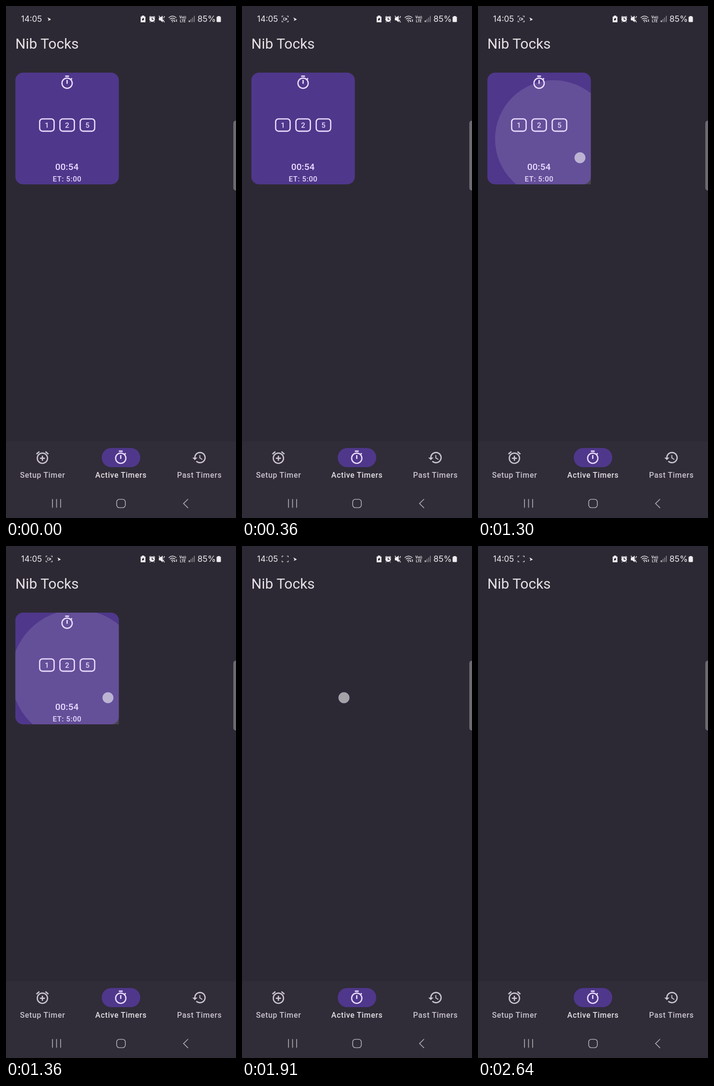
Recreate the animation shown at these times as an HTML page. Size 480 by 1068 pixels, loop 2.67 s.

```html
<!DOCTYPE html>
<html lang="en">
<head>
<meta charset="utf-8">
<title>Timer app</title>
<style>
html, body { margin: 0; width: 100%; height: 100%; overflow: hidden; background: #2d2934; }
svg { display: block; width: 100vw; height: 100vh; font-family: Roboto, sans-serif; }
.mid { text-anchor: middle; font-weight: 500; }
.nav { font-size: 16px; letter-spacing: .67px; }
.status { font-family: Inter, Roboto, sans-serif; fill: #eeecf0; }
.line { fill: none; stroke: #eeecf0; stroke-width: 1.4; }
.sys { fill: none; stroke: #aaa7ae; stroke-width: 1.7; }
</style>
</head>
<body>
<svg viewBox="0 0 480 1068">
  <defs>
    <path id="timer" transform="scale(1.3333)" d="M15 1H9v2h6V1zm-4 13h2V8h-2v6zm8.03-6.61l1.42-1.42c-.43-.51-.9-.99-1.41-1.41l-1.42 1.42C16.07 4.74 14.12 4 12 4c-4.97 0-9 4.03-9 9s4.02 9 9 9 9-4.03 9-9c0-2.12-.74-4.07-1.97-5.61zM12 20c-3.87 0-7-3.13-7-7s3.13-7 7-7 7 3.13 7 7-3.13 7-7 7z"/>
    <path id="add" transform="scale(1.3333)" d="M7.88 3.39L6.6 1.86 2 5.71l1.29 1.53 4.59-3.85zM22 5.72l-4.6-3.86-1.29 1.53 4.6 3.86L22 5.72zM12 4c-4.97 0-9 4.03-9 9s4.02 9 9 9 9-4.03 9-9-4.03-9-9-9zm0 16c-3.87 0-7-3.13-7-7s3.13-7 7-7 7 3.13 7 7-3.13 7-7 7zm1-11h-2v3H8v2h3v3h2v-3h3v-2h-3V9z"/>
    <path id="past" transform="scale(1.3333)" d="M13 3c-4.97 0-9 4.03-9 9H1l3.89 3.89.07.14L9 12H6c0-3.87 3.13-7 7-7s7 3.13 7 7-3.13 7-7 7c-1.93 0-3.68-.79-4.94-2.06l-1.42 1.42C8.27 19.99 10.51 21 13 21c4.97 0 9-4.03 9-9s-4.03-9-9-9zm-1 5v5l4.28 2.54.72-1.21-3.5-2.08V8H12z"/>
    <clipPath id="cardArea"><rect x="19.5" y="139" width="216" height="233"/></clipPath>
  </defs>
  <rect width="480" height="1068" fill="#2d2934"/>

  <!-- status bar -->
  <g class="status">
    <text x="31.5" y="33" font-size="17">14:05</text>
    <g id="recorder" class="line" style="stroke-width:1.2">
      <path d="M83.5 23.500V21H86.500M93.500 21h3v2.500M96.500 30.500V33h-3M86.500 33h-3v-2.500"/>
      <path id="camera" d="M86.500 25h4.500v4.500h-4.500zM91 27l2.500-1.500v3.500z" stroke-width="1"/>
    </g>
    <path id="mark" d="M-3.500-3.500L0-2 4 .5 1.500 2-2.500 3.500-1 .5Z"/>
    <path d="M283.500 22V20h5v2h2.500v12h-10V22z"/>
    <path d="M284 30.500v-4l4-1.500v4l-4 1.500z" fill="#2d2934"/>
    <circle cx="305" cy="27.500" r="5.800"/>
    <path class="line" d="M299 24l3-3M311 24l-3-3M301 33l-1 1M309 33l1 1"/>
    <path class="line" d="M305 24v4h3" style="stroke:#2d2934"/>
    <path d="M319 24h3l5-4v14l-5-4h-3z"/>
    <path class="line" d="M319 20.500L331 34M329 23.500v2M330.500 21v3M329 28.500v2"/>
    <path class="line" d="M339.500 24.500q8-7 16 0M342 27.500q5.500-4.500 11 0M344.500 30.500q3-2.500 6 0"/>
    <path d="M345.500 32h4l-2 2zM351 30h2v3h-2zM355 28h1.500v5H355z"/>
    <g font-size="7" font-weight="700" text-anchor="middle"><text x="369" y="26">Vo))</text><text x="369" y="33.500">LTE</text></g>
    <path d="M381.500 30h2v3.500h-2z"/>
    <path d="M385 27h2v6.500h-2zM388.500 24h2v9.500h-2zM392 20.500h2v13h-2z" opacity=".4"/>
    <text x="399.500" y="33" font-size="17.500">85%</text>
    <path d="M441.500 22.500v-1.500h5v1.500h2v9.500q0 1.500-1.500 1.500h-6q-1.500 0-1.500-1.500v-9.500z"/>
  </g>

  <text x="19.500" y="89" font-size="30" fill="#e6e1e5">Nib Tocks</text>

  <g id="card" fill="#eaddff">
    <rect x="19.500" y="139" width="216" height="233" rx="16" fill="#4f378b"/>
    <g clip-path="url(#cardArea)"><circle id="ripple" fill="#fff"/></g>
    <use href="#timer" transform="translate(111.500 143.700)"/>
    <g id="boxes" class="mid" font-size="15"></g>
    <text class="mid" x="127.200" y="342" font-size="19" letter-spacing=".13">00:54</text>
    <text class="mid" x="127.600" y="366" font-size="15" letter-spacing=".67">ET: 5:00</text>
  </g>
  <circle id="touch" cx="212.800" cy="316.500" r="11.200" fill="#fff" fill-opacity=".57" stroke="#b4acdf" stroke-opacity=".6"/>

  <path d="M480 240h-1q-4 0-4 5v134q0 5 4 5h1" fill="#6c6971" stroke="#88858d" stroke-width=".8"/>

  <!-- bottom navigation -->
  <rect y="908" width="480" height="160" fill="#302c38"/>
  <rect x="199.700" y="922" width="80.500" height="40" rx="20" fill="#4f378b"/>
  <g fill="#cac4d0">
    <use href="#add" transform="translate(60 926)"/>
    <use href="#past" transform="translate(387.500 926)"/>
    <text class="mid nav" x="76.300" y="984">Setup Timer</text>
    <text class="mid nav" x="403.700" y="984">Past Timers</text>
  </g>
  <use href="#timer" transform="translate(223.500 926)" fill="#eaddff"/>
  <text class="mid nav" x="240" y="984" fill="#e6e1e5">Active Timers</text>
  <path class="sys" d="M97 1028.500v18M105.500 1028.500v18M114 1028.500v18M380 1028.500l-9.500 9.300 9.500 9.300"/>
  <rect class="sys" x="231" y="1029" width="18" height="17.500" rx="5.500"/>
</svg>
<script>
const LOOP = 2670;
const $ = id => document.getElementById(id);
const show = (id, on) => $(id).setAttribute('visibility', on ? 'inherit' : 'hidden');
const set = (id, attrs) => {
  for (const key in attrs) $(id).setAttribute(key, attrs[key]);
};
const mix = (a, b, k) => a + (b - a) * k;
const clamp = v => Math.min(1, Math.max(0, v));

// cubic-bezier(.25, .1, .25, 1), solved by bisection
function ease(p) {
  const curve = (a, b, s) => 3 * a * s * (1 - s) ** 2 + 3 * b * s * s * (1 - s) + s ** 3;
  let lo = 0, hi = 1;
  for (let i = 0; i < 20; i++) {
    const s = (lo + hi) / 2;
    if (curve(.25, .25, s) < p) lo = s; else hi = s;
  }
  return curve(.1, 1, hi);
}

$('boxes').innerHTML = [[85.3, 1], [127.6, 2], [170, 5]].map(([x, n]) =>
  `<rect x="${x - 15.1}" y="235.5" width="30.2" height="25.6" rx="6" fill="none" stroke="#eaddff" stroke-width="2.6"/>
   <text x="${x}" y="253.5">${n}</text>`).join('');

function draw(now) {
  const t = now % LOOP;
  const recording = t >= 100;
  show('recorder', recording);
  show('camera', recording && t % 1000 >= 100 && t % 1000 < 600);
  set('mark', { transform: `translate(${recording ? 110.5 : 90} 27.5)` });

  show('touch', t >= 1000 && t < 2100);
  show('card', t < 1790);

  const k = ease(clamp((t - 1060) / 650));
  set('ripple', {
    cx: mix(212.8, 127.5, k),
    cy: mix(316.5, 255.5, k),
    r: mix(48, 165, k),
    opacity: .12 * clamp((t - 1060) / 75)
  });
  requestAnimationFrame(draw);
}
requestAnimationFrame(draw);
</script>
</body>
</html>
```
